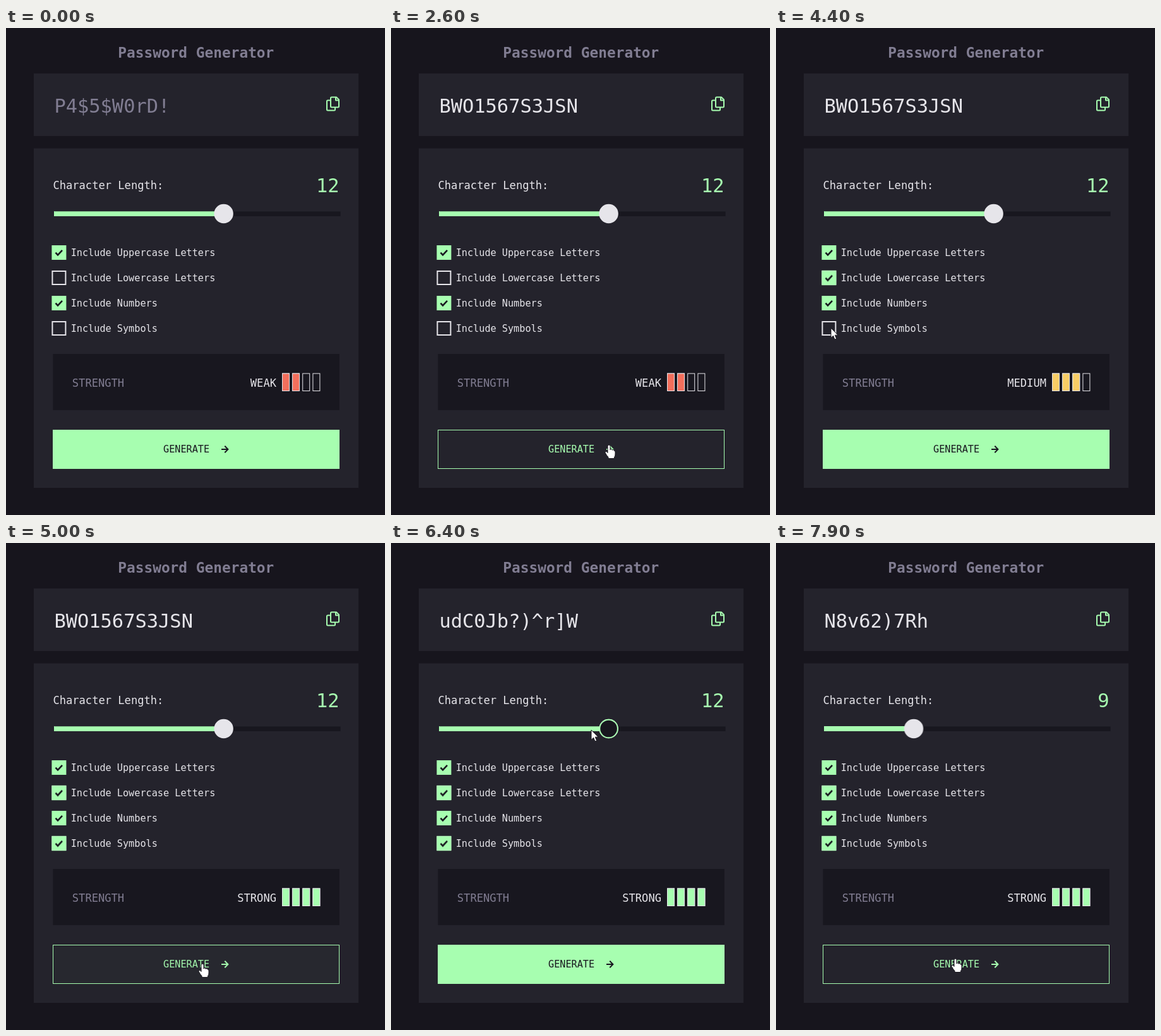
Animation of 600x771 px, one loop 8000 ms. Source, as an HTML page:

```html
<!DOCTYPE html>
<html lang="en">
<head>
<meta charset="utf-8">
<title>Password Generator</title>
<style>
  :root { --green: #a7feb0; --card: #24232c; --dark: #18171f; --white: #e6e5ea; --grey: #817d92; }
  html, body { margin: 0; width: 100%; height: 100%; overflow: hidden; background: #17151d; }
  svg { display: block; }
  text { font-family: "DejaVu Sans Mono", "Noto Sans Mono", monospace; font-size: 15.2px; fill: var(--white); white-space: pre; }
  .mid { font-size: 17.1px; }
  .big { font-size: 30.4px; }
  .grey { fill: var(--grey); }
  .end { text-anchor: end; }
  .green { fill: var(--green); }
  .dark { fill: var(--dark); }
  .card { fill: var(--card); }
  .line { fill: none; stroke-width: 2; }

  /* Parts that switch on and off without a fade */
  .show { opacity: 0; animation: 8s step-end infinite; }
  .pass1 { animation-name: pass1; }
  .pass2 { animation-name: pass2; }
  .pass3 { animation-name: pass3; }
  .pass4 { animation-name: pass4; }
  .len12 { animation-name: len12; }
  .len11 { animation-name: len11; }
  .len10 { animation-name: len10; }
  .len9 { animation-name: len9; }
  .weak { animation-name: weak; }
  .medium { animation-name: medium; }
  .strong { animation-name: strong; }
  .lower { animation-name: lower; }
  .grab { animation-name: grab; }
  .arrow { animation-name: arrow; }
  .hand { animation-name: hand; }

  @keyframes pass1 { 0% { opacity: 1 } 16.25%, 100% { opacity: 0 } }
  @keyframes pass2 { 0% { opacity: 0 } 16.25% { opacity: 1 } 67.5%, 100% { opacity: 0 } }
  @keyframes pass3 { 0% { opacity: 0 } 67.5% { opacity: 1 } 95%, 100% { opacity: 0 } }
  @keyframes pass4 { 0% { opacity: 0 } 95%, 100% { opacity: 1 } }
  @keyframes len12 { 0% { opacity: 1 } 82.5%, 100% { opacity: 0 } }
  @keyframes len11 { 0% { opacity: 0 } 82.5% { opacity: 1 } 83.75%, 100% { opacity: 0 } }
  @keyframes len10 { 0% { opacity: 0 } 83.75% { opacity: 1 } 85%, 100% { opacity: 0 } }
  @keyframes len9 { 0% { opacity: 0 } 85%, 100% { opacity: 1 } }
  @keyframes weak { 0% { opacity: 1 } 46.25%, 100% { opacity: 0 } }
  @keyframes medium { 0% { opacity: 0 } 46.25% { opacity: 1 } 57.5%, 100% { opacity: 0 } }
  @keyframes strong { 0% { opacity: 0 } 57.5%, 100% { opacity: 1 } }
  @keyframes lower { 0% { opacity: 0 } 46.25%, 100% { opacity: 1 } }
  @keyframes grab { 0% { opacity: 0 } 78.75% { opacity: 1 } 87%, 100% { opacity: 0 } }
  @keyframes arrow {
    0% { opacity: 0 } 1.25% { opacity: 1 } 7.7% { opacity: 0 } 35% { opacity: 1 }
    60% { opacity: 0 } 70.5% { opacity: 1 } 91.5%, 100% { opacity: 0 }
  }
  @keyframes hand {
    0% { opacity: 0 } 7.7% { opacity: 1 } 35% { opacity: 0 }
    60% { opacity: 1 } 70.5% { opacity: 0 } 91.5%, 100% { opacity: 1 }
  }

  .slide { animation: slide 8s step-end infinite; }
  @keyframes slide {
    0% { transform: none } 82.5% { transform: translateX(-42.2px) }
    83.75% { transform: translateX(-84.4px) } 85%, 100% { transform: translateX(-126.6px) }
  }

  .hover { animation: hover 8s ease infinite; }
  @keyframes hover {
    0%, 7.75% { opacity: 0 } 10.9%, 35% { opacity: 1 }
    38.1%, 60% { opacity: 0 } 63.1%, 70.5% { opacity: 1 }
    73.6%, 91.5% { opacity: 0 } 94.6%, 100% { opacity: 1 }
  }

  .cursor { animation: move 8s linear infinite; }
  @keyframes move {
    0%, 1.25% { transform: translate(14px, 560px) }
    7.5% { transform: translate(300px, 632px) }
    8.75% { transform: translate(350px, 673px) }
    10% { transform: translate(352px, 679px) }
    13% { transform: translate(348px, 668px) }
    32.5%, 34% { transform: translate(345px, 660px) }
    35% { transform: translate(335px, 636px) }
    38.5% { transform: translate(190px, 500px) }
    42.5% { transform: translate(90px, 397px) }
    46%, 49% { transform: translate(88px, 398px) }
    55%, 57.5% { transform: translate(87px, 475px) }
    60% { transform: translate(240px, 636px) }
    62.5% { transform: translate(311px, 666px) }
    64%, 69% { transform: translate(314px, 668px) }
    70.5% { transform: translate(313px, 636px) }
    75% { transform: translate(308px, 430px) }
    78.75% { transform: translate(312px, 300px) }
    80%, 81.5% { transform: translate(317px, 296px) }
    85% { transform: translate(215px, 294px) }
    86.5% { transform: translate(206px, 297px) }
    88.75% { transform: translate(178px, 564px) }
    91.5% { transform: translate(255px, 638px) }
    95%, 100% { transform: translate(284px, 658px) }
  }
</style>
</head>
<body>
<svg width="600" height="771" viewBox="0 0 600 771">
  <defs>
    <g id="box"><rect x="73.4" y="-10.4" width="21" height="21" fill="none" stroke="#e6e5ea" stroke-width="2"/></g>
    <g id="check">
      <rect class="green" x="72.4" y="-11.4" width="23" height="23"/>
      <path d="M78.5 .3L82 4L89 -3.6" fill="none" stroke="#18171f" stroke-width="2.6"/>
    </g>
    <rect id="bar" y="547" width="11" height="27.5" stroke="#e6e5ea"/>
    <path id="go" class="line" d="M341 667H351M346.3 661.8L351.4 667L346.3 672.2"/>
  </defs>

  <text x="300.8" y="46.5" class="grey" font-weight="700" text-anchor="middle" style="font-size:22.8px">Password Generator</text>

  <!-- Password -->
  <rect class="card" x="44" y="72" width="514" height="99"/>
  <g class="big">
    <text x="76.4" y="133.5" class="big grey show pass1">P4$5$W0rD!</text>
    <text x="76.4" y="133.5" class="big show pass2">BWO1567S3JSN</text>
    <text x="76.4" y="133.5" class="big show pass3">udC0Jb?)^r]W</text>
    <text x="76.4" y="133.5" class="big show pass4">N8v62)7Rh</text>
  </g>
  <g class="line" stroke="#a7feb0" stroke-linejoin="round">
    <path d="M515.5 109.5H523L527 113.5V124Q527 125.5 525.5 125.5H515.5Q514 125.5 514 124V111Q514 109.5 515.5 109.5Z"/>
    <path d="M522 109.5V114.5H527"/>
    <path d="M514 114.5H509.5Q508 114.5 508 116V129Q508 130.5 509.5 130.5H519.5Q521 130.5 521 129V125.5"/>
  </g>

  <!-- Length -->
  <rect class="card" x="44" y="190.5" width="514" height="537.5"/>
  <text x="74.4" y="255" class="mid">Character Length:</text>
  <text x="527.6" y="260" class="big green end show len12">12</text>
  <text x="527.6" y="260" class="big green end show len11">11</text>
  <text x="527.6" y="260" class="big green end show len10">10</text>
  <text x="527.6" y="260" class="big green end show len9">9</text>
  <svg x="76" y="290.3" width="453.6" height="7.6">
    <rect class="dark" width="454" height="8"/>
    <rect class="green slide" width="268.6" x="0" height="8"/>
    <rect class="green slide" x="-130" width="131" height="8"/>
  </svg>
  <g class="slide">
    <circle cx="344.6" cy="294" r="15.2" fill="#e6e5ea"/>
    <g class="show grab">
      <circle cx="344.6" cy="294" r="15.2" class="green"/>
      <circle cx="344.6" cy="294" r="13.3" class="dark"/>
    </g>
  </g>

  <!-- Options -->
  <use href="#check" y="355.4"/>
  <use href="#box" y="395.4"/>
  <use href="#check" y="395.4" class="show lower"/>
  <use href="#check" y="435.4"/>
  <use href="#box" y="475.4"/>
  <use href="#check" y="475.4" class="show strong"/>
  <text x="102.7" y="360.8">Include Uppercase Letters</text>
  <text x="102.7" y="400.8">Include Lowercase Letters</text>
  <text x="102.7" y="440.8">Include Numbers</text>
  <text x="102.7" y="480.8">Include Symbols</text>

  <!-- Strength -->
  <rect class="dark" x="74.4" y="516" width="453.4" height="89"/>
  <text x="104.8" y="567.5" class="mid grey">STRENGTH</text>
  <g fill="none">
    <use href="#bar" x="437.5"/><use href="#bar" x="453.5"/><use href="#bar" x="469.7"/><use href="#bar" x="485.9"/>
  </g>
  <g class="show weak" fill="#f36f5c">
    <text x="428" y="567.5" class="mid end">WEAK</text>
    <use href="#bar" x="437.5"/><use href="#bar" x="453.5"/>
  </g>
  <g class="show medium" fill="#f8cd65">
    <text x="428" y="567.5" class="mid end">MEDIUM</text>
    <use href="#bar" x="437.5"/><use href="#bar" x="453.5"/><use href="#bar" x="469.7"/>
  </g>
  <g class="show strong" fill="#a7feb0">
    <text x="428" y="567.5" class="mid end">STRONG</text>
    <use href="#bar" x="437.5"/><use href="#bar" x="453.5"/><use href="#bar" x="469.7"/><use href="#bar" x="485.9"/>
  </g>

  <!-- Button: the hovered look fades in over the plain one -->
  <rect class="green" x="74" y="636" width="454" height="62"/>
  <text x="249" y="672.2" class="dark">GENERATE</text>
  <use href="#go" stroke="#18171f"/>
  <g class="hover">
    <rect class="card" x="75" y="637" width="452" height="60"/>
    <text x="249" y="672.2" class="green">GENERATE</text>
    <use href="#go" stroke="#a7feb0"/>
  </g>

  <g class="cursor" fill="#fff" stroke="#17151d" stroke-linejoin="round">
    <path class="show arrow" d="M0 0V15.5L3.6 12.2L6 18L8.7 16.9L6.3 11.2H11Z"/>
    <path class="show hand" d="M-2 2Q-2 0 0 0T2 2V8Q2 6.8 3.6 6.8T5.4 8.4Q5.6 7.4 7 7.6T8.4 9.4Q10 9 10 11V15Q10 18 8.4 19.5V21.5H-1V19.5Q-3.5 17 -5.8 12.5Q-6.5 10.5 -5 10.3Q-3.5 10.2 -2 12.5Z"/>
  </g>
</svg>
</body>
</html>
```
